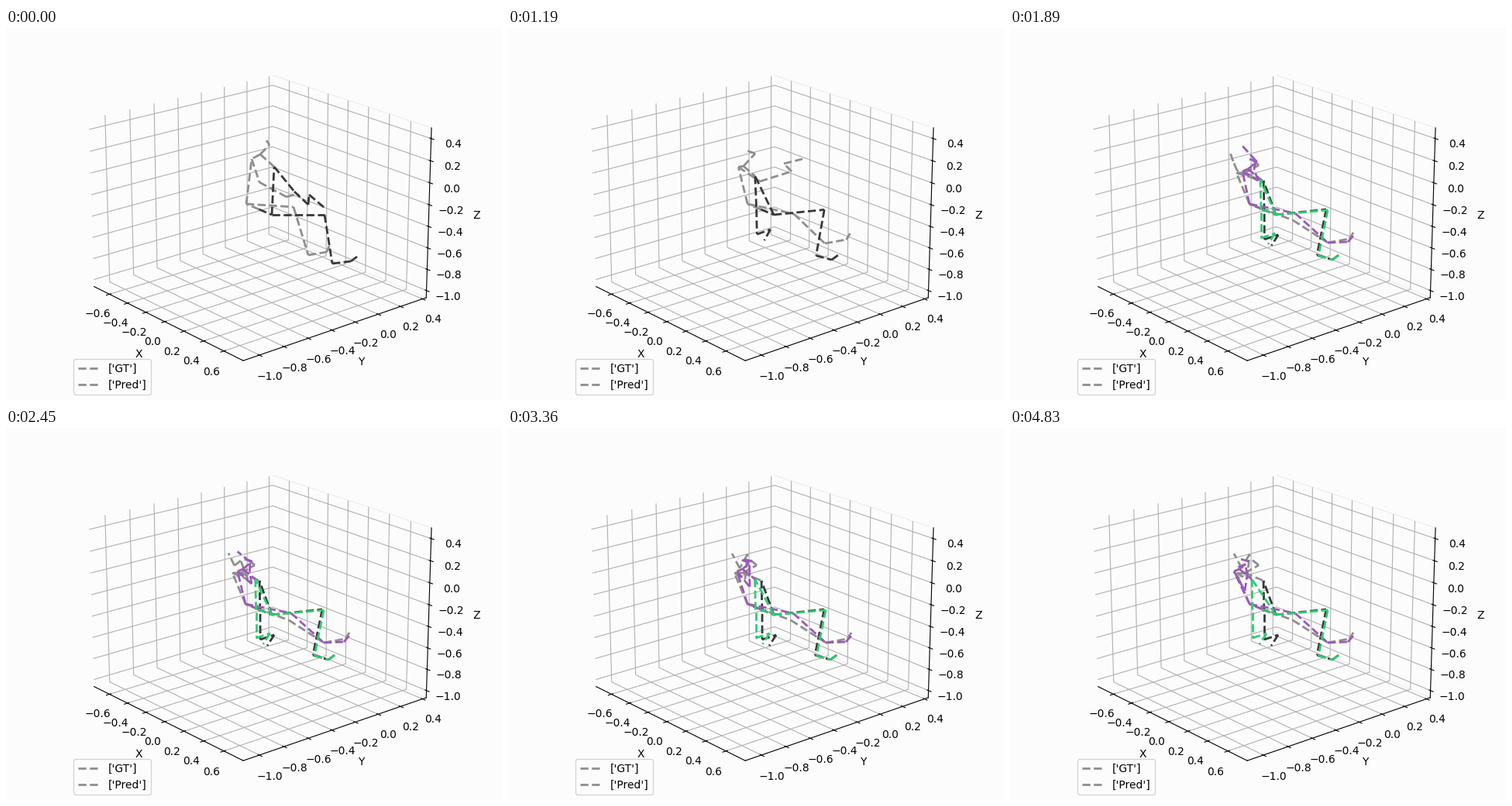
A matplotlib script that plays this animation: 640 px wide and 480 px high, repeating every 4900 ms.

```python
import numpy as np
import matplotlib.pyplot as plt
from matplotlib.animation import FuncAnimation
from matplotlib.lines import Line2D
from matplotlib.transforms import Affine2D

W, H, DPI = 640, 480, 100
FRAMES, INTERVAL = 70, 70
PRED_START, PRED_SETTLED = 20, 27
BG = "#fcfcfc"
GT_COLORS = {"l": "#8e8e8e", "r": "#383838"}
PRED_COLORS = {"l": "#9b59b6", "r": "#2ecc71"}

LEG = ("hip", "knee", "ankle", "foot", "toe")
ARM = ("shoulder", "elbow", "wrist", "thumb", "tip")


def limb(side, parts):
    return [f"{side}_{part}" for part in parts]


def bones(side, *names):
    return [(side, a, b) for a, b in zip(names, names[1:])]


BONES = (bones("l", "pelvis", *limb("l", LEG))
         + bones("r", "pelvis", *limb("r", LEG))
         + bones("l", "l_hip", *limb("l", ARM))
         + bones("r", "r_hip", *limb("r", ARM))
         + bones("l", "r_shoulder"[::1], "neck")[:0]
         + bones("l", "neck", "r_shoulder")
         + bones("l", "neck", "l_shoulder")
         + bones("l", "neck", "head", "crown"))

# First and resting place of each joint, in pixels
LEGS = {
    "l_hip": ((310, 227), (309, 227)), "r_hip": ((343, 241), (343, 241)),
    "l_knee": ((371, 231), (365, 248)), "r_knee": ((411, 241), (408, 234)),
    "l_ankle": ((390, 293), (410, 277)), "r_ankle": ((421, 304), (396, 293)),
    "l_foot": ((414, 289), (438, 272)), "r_foot": ((445, 301), (416, 299)),
    "l_toe": ((417, 281), (443, 264)), "r_toe": ((453, 295), (424, 293)),
}
UPPER = {
    "neck": ((328, 163), (303, 187)), "head": ((340, 151), (321, 177)),
    "crown": ((336, 145), (311, 169)), "l_shoulder": ((317, 169), (292, 187)),
    "r_shoulder": ((346, 179), (327, 197)), "r_elbow": ((372, 211), (328, 240)),
    "r_wrist": ((390, 228), (328, 273)), "r_thumb": ((391, 215), (346, 267)),
    "r_tip": ((411, 232), (337, 281)),
}

# The left hand reaches out, then folds back to the head
HAND_TIMES = (0, 9, 17, 27, 40)
HAND = {
    "l_elbow": ((327, 199), (306, 205), (325, 198), (322, 196), (306, 195)),
    "l_wrist": ((362, 218), (350, 213), (366, 185), (293, 184), (309, 163)),
    "l_thumb": ((376, 214), (359, 204), (356, 175), (288, 172), (299, 181)),
    "l_tip": ((378, 217), (363, 212), (380, 169), (284, 161), (289, 162)),
}

# Passing displacement on the way to rest
SWAY = {"neck": (0, -9), "head": (-3, -16), "crown": (-3, -11),
        "l_shoulder": (5, -8), "l_knee": (4, -8)}
SWAY.update({name: (-10, -6) for name in limb("r", ARM)})

# Error of the prediction, and how far its left arm sinks later
ERROR = {"neck": (4, -5), "head": (-2, -5), "crown": (-3, 0),
         "l_shoulder": (8, -2), "l_elbow": (14, 2), "l_wrist": (6, 19),
         "l_thumb": (18, -10), "l_tip": (9, -12),
         "l_knee": (3, -9), "l_foot": (-2, 4), "l_toe": (0, 4),
         "r_knee": (2, 1), "r_ankle": (2, 1)}
ERROR.update({name: (-4, -2) for name in limb("r", ARM)})
SAG = {"l_elbow": (-6, 13), "l_wrist": (2, 8), "l_thumb": (-2, 5),
       "l_tip": (6, 30)}
DRIFT = np.array([-11, 0])


def smooth(x):
    x = np.clip(x, 0, 1)
    return x * x * (3 - 2 * x)


def mix(a, b, k):
    return np.array(a) * (1 - k) + np.array(b) * k


def shift(offsets, name):
    return np.array(offsets.get(name, (0, 0)))


def with_pelvis(pose):
    pose["pelvis"] = mix(pose["l_hip"], pose["r_hip"], 0.5)
    return pose


def true_pose(t):
    step = smooth(t / 20)
    sink = 1 - np.exp(-t / 5)
    sway = np.sin(np.pi * min(t / 26, 1))
    pose = {name: mix(*ends, step) for name, ends in LEGS.items()}
    pose.update({name: mix(*ends, sink) for name, ends in UPPER.items()})
    for name in pose:
        pose[name] = pose[name] + sway * shift(SWAY, name)
    for name, path in HAND.items():
        pose[name] = np.array([np.interp(t, HAND_TIMES, c) for c in zip(*path)])
    return with_pelvis(pose)


SPLIT = true_pose(PRED_START)
REST = true_pose(FRAMES)


def predicted_pose(t):
    """Leaves the true pose, settles beside it, then slowly drifts left."""
    part = smooth((t - PRED_START) / (PRED_SETTLED - PRED_START))
    late = max(0, (t - PRED_SETTLED) / (FRAMES - 1 - PRED_SETTLED))
    pose = {}
    for name in [*LEGS, *UPPER, *HAND]:
        point = mix(SPLIT[name], REST[name] + shift(ERROR, name), part)
        if name not in LEGS:
            point = point + DRIFT * late ** 1.3 + shift(SAG, name) * late ** 0.7
        pose[name] = point
    return with_pelvis(pose)


fig = plt.figure(figsize=(W / DPI, H / DPI), dpi=DPI, facecolor=BG)
ax = fig.add_axes((0, 0, 1, 1), projection="3d", facecolor=BG)
ax.view_init(elev=20, azim=-40)

reach = 0.75 * 25 / 24
for set_limits, mid in ((ax.set_xlim, 0.007), (ax.set_ylim, -0.347),
                        (ax.set_zlim, -0.286)):
    set_limits(mid - reach, mid + reach)
ax.set(xlabel="X", ylabel="Y", zlabel="Z")
for axis, edge in ((ax.xaxis, BG), (ax.yaxis, "#f0f0f0"), (ax.zaxis, "#f3f3f3")):
    axis.set_pane_color(BG)
    axis.pane.set_edgecolor(edge)

keys = [Line2D([], [], color=GT_COLORS["l"], lw=2, ls="--", label=text)
        for text in ("['GT']", "['Pred']")]
ax.legend(handles=keys, loc="lower left", facecolor=BG)

# Pixel coordinates with the origin at the top left
pixels = Affine2D().scale(1 / W, -1 / H).translate(0, 1) + fig.transFigure


def make_skeleton(colors):
    return [fig.add_artist(Line2D([], [], color=colors[side], lw=2, ls="--",
                                  transform=pixels))
            for side, _, _ in BONES]


def set_pose(lines, pose):
    for line, (_, start, end) in zip(lines, BONES):
        line.set_data(*zip(pose[start], pose[end]))


truth = make_skeleton(GT_COLORS)
prediction = make_skeleton(PRED_COLORS)


def update(i):
    set_pose(truth, true_pose(i))
    set_pose(prediction, predicted_pose(i))
    for line in prediction:
        line.set_visible(i >= PRED_START)
    return truth + prediction


anim = FuncAnimation(fig, update, frames=FRAMES, interval=INTERVAL, repeat=True)
plt.show()
```
